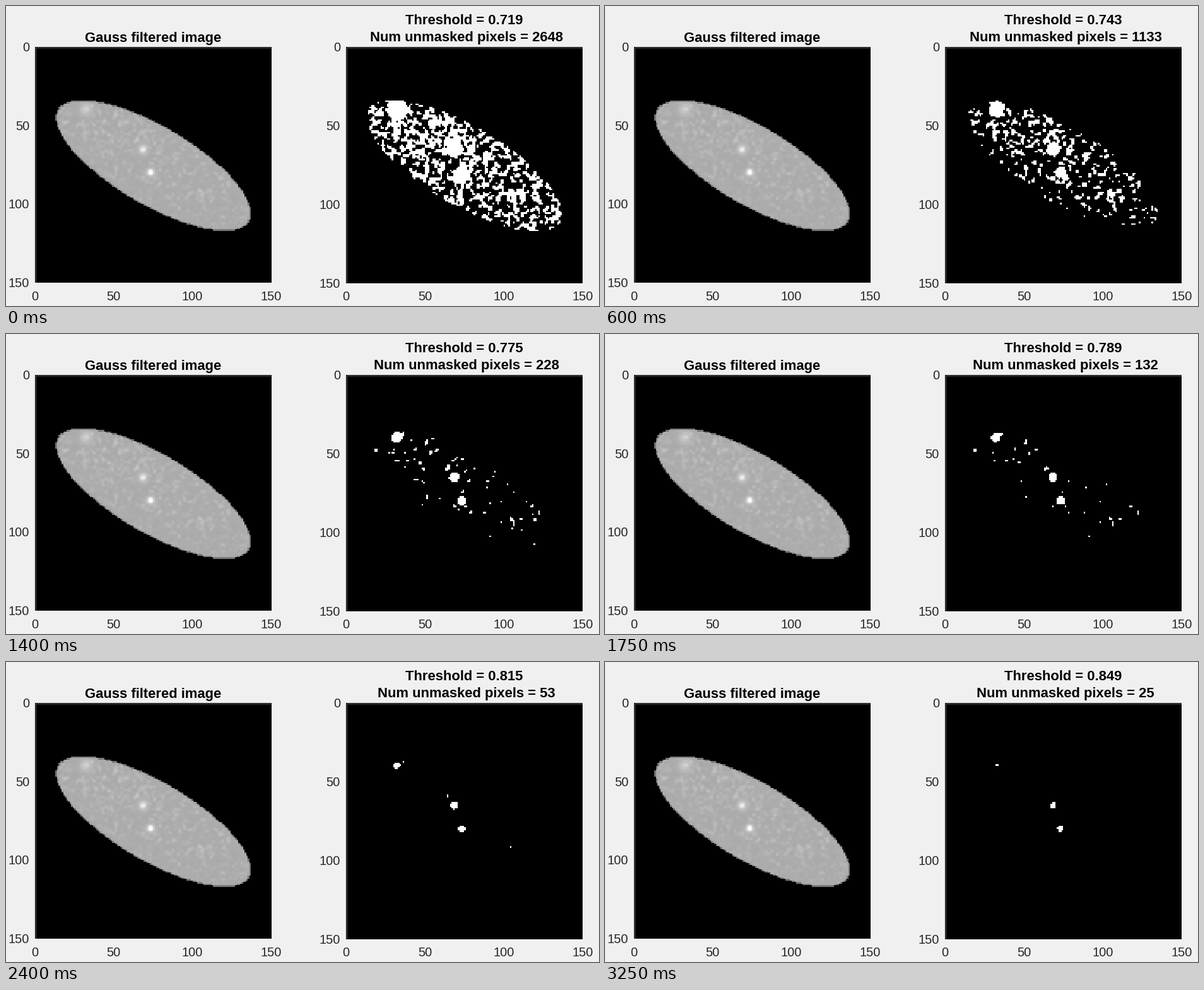
Animation of 940x476 px, one loop 3300 ms. Source, as a matplotlib script:

```python
import numpy as np
import matplotlib.pyplot as plt
from matplotlib.animation import FuncAnimation
from matplotlib.patches import Rectangle

W, H, DPI = 940, 476, 100
FRAMES, STEP_MS = 66, 50
SIZE = 150
BG = "#f0f0f0"
INK = "#262626"
FRAME = "#5a5a5a"

# Bright spots: x, y, peak, width
SPOTS = [(73.5, 79.8, 7, 1.8), (68.7, 65.2, 5.2, 2.2), (32.5, 39.8, 3.8, 2.8)]


def blur(a, passes):
    for _ in range(passes):
        for axis in (0, 1):
            a = (np.roll(a, 1, axis) + 2 * a + np.roll(a, -1, axis)) / 4
    return a


def make_field():
    """Smoothed noise inside a tilted ellipse, with bright spots on top."""
    rng = np.random.default_rng(12)
    y, x = np.mgrid[0:SIZE, 0:SIZE] + 0.5
    tilt = np.radians(30.5)
    dx, dy = x - 75.2, y - 75.4
    u = (dx * np.cos(tilt) + dy * np.sin(tilt)) / 70.3
    v = (dy * np.cos(tilt) - dx * np.sin(tilt)) / 25
    inside = u**2 + v**2 <= 1
    cover = blur(inside.astype(float), 3)

    noise = blur(rng.standard_normal((SIZE, SIZE)), 1)
    noise /= noise.std()
    trend = -0.35 * u - 0.5 * (v + 0.2)**2
    field = noise + trend - 6 * (1 - cover)
    for sx, sy, peak, width in SPOTS:
        d2 = (x - sx)**2 + (y - sy)**2
        glow = peak * np.exp(-d2 / (2 * width**2))
        field = np.maximum(field, glow + 0.2 * noise)
    return field, inside, cover


def shade(field, inside, cover):
    grey = np.interp(field, [-2, 2, 3.5, 6], [158, 186, 202, 255])
    grey[cover < 0.7] = 118
    grey[~inside] = 0
    return grey


field, inside, cover = make_field()
score = np.where(inside, field, -99)
rank = np.argsort(np.argsort(-score, axis=None)).reshape(SIZE, SIZE)

# Surviving pixels fall almost exponentially as the threshold rises
counts = np.rint(np.exp(np.interp(
    np.arange(FRAMES), [0, 12, 19, 28, 41, 55, 65],
    np.log([2648, 1133, 610, 228, 83, 34, 25])))).astype(int)

fig = plt.figure(figsize=(W / DPI, H / DPI), dpi=DPI, facecolor=BG)


def label(x, y, text, size=20, ha="center", weight="normal", color=INK):
    return fig.text(x / W, 1 - y / H, text, fontsize=size * 72 / DPI, ha=ha,
                    va="baseline", family="Liberation Sans", weight=weight,
                    color=color)


def title(x, y, text):
    return label(x, y, text, 22, weight="bold", color="black")


def panel(left, top, side, image):
    ax = fig.add_axes([left / W, 1 - (top + side) / H, side / W, side / H])
    ax.axis("off")
    art = ax.imshow(image, extent=(0, SIZE, SIZE, 0), interpolation="nearest",
                    aspect="auto", cmap="gray", vmin=0, vmax=255)
    inset = 0.5 * SIZE / side
    ax.add_patch(Rectangle((inset, inset), SIZE - 2 * inset, SIZE - 2 * inset,
                           fill=False, ec=FRAME, lw=0.72))
    for tick in range(0, SIZE + 1, 50):
        at = tick * side / SIZE
        label(left + at, 467, str(tick))
        label(left - 9, top + at + 7, str(tick), ha="right")
    return art


def mask(i):
    return np.where(rank < counts[i], 255, 0)


panel(46, 65, 374, shade(field, inside, cover))
title(233, 57, "Gauss filtered image")
mask_art = panel(539, 65, 375, mask(0))
threshold_text = title(726.5, 29, "")
count_text = title(730, 56, "")


def update(i):
    mask_art.set_data(mask(i))
    threshold_text.set_text(f"Threshold = {0.719 + 0.002 * i:.3f}")
    count_text.set_text(f"Num unmasked pixels = {counts[i]}")
    return mask_art, threshold_text, count_text


anim = FuncAnimation(fig, update, frames=FRAMES, interval=STEP_MS, repeat=True,
                     repeat_delay=0, blit=False)
plt.show()
```
